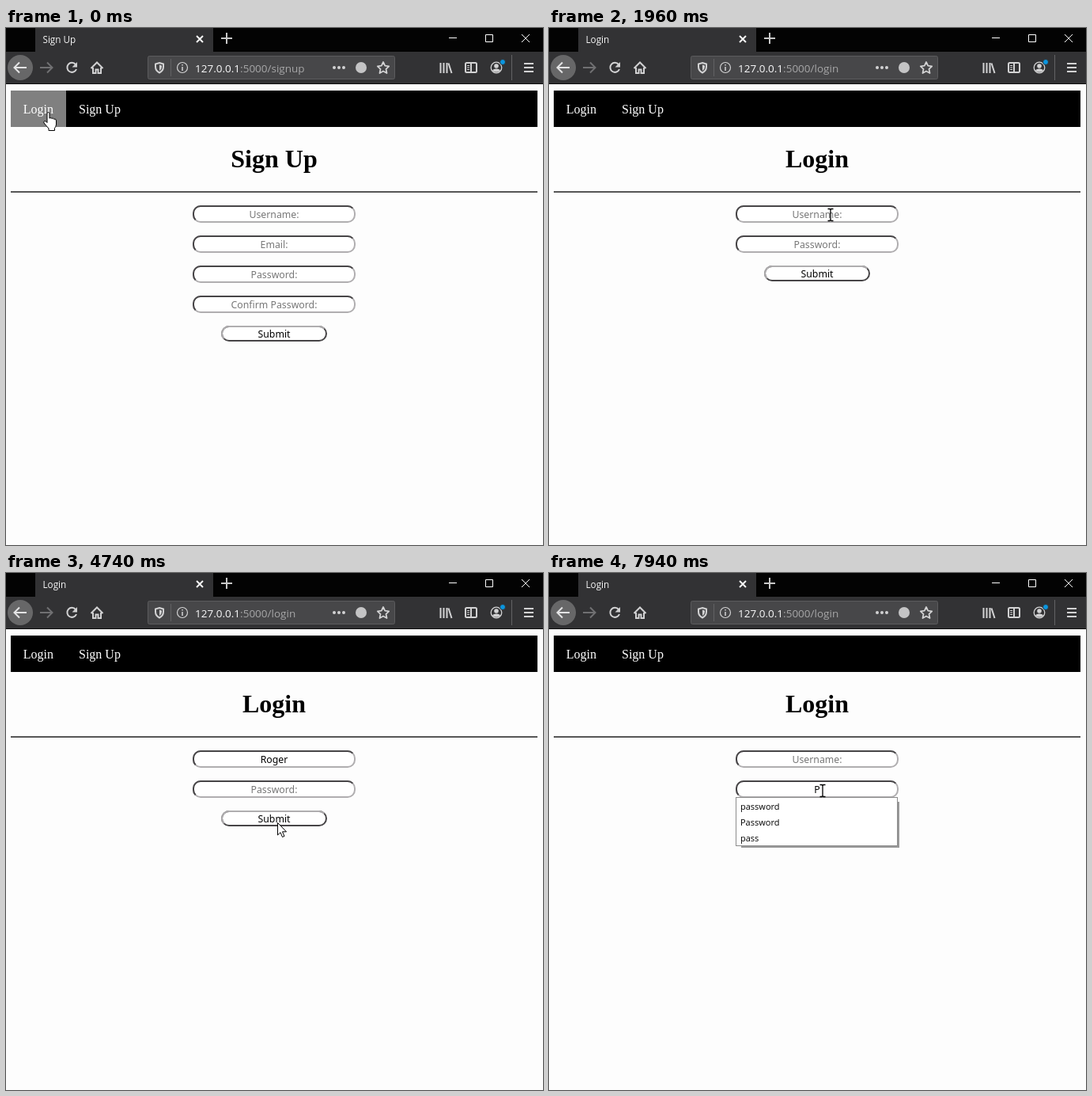
Write an HTML page that moves like this. It is 679 px wide and 653 px high and loops after 8000 ms.

```html
<!DOCTYPE html>
<html lang="en">
<head>
<meta charset="utf-8">
<title>Login form</title>
<style>
html, body { margin: 0; width: 100%; height: 100%; overflow: hidden; background: #fdfdfd; }
svg { display: block; width: 679px; height: 653px; }
text { white-space: pre; }
.ui { font-family: "Open Sans", sans-serif; }
.form { font: 12.3px "Noto Sans", sans-serif; text-anchor: middle; }
.nav { font: 16px "Liberation Serif", serif; fill: #fff; }
.head { font: bold 32px "Liberation Serif", serif; text-anchor: middle; }
.line { fill: none; stroke: #d2d2d3; stroke-width: 2; }
</style>
</head>
<body>
<svg viewBox="0 0 679 653">
  <rect width="679" height="653" fill="#fdfdfd"/>
  <!-- browser window -->
  <rect width="679" height="30" fill="#030303"/>
  <path d="M37 0H262V30H679V70H0V30H37Z" fill="#323234"/>
  <rect id="glow" x="37" width="166" height="30"/>
  <rect y="70" width="679" height="1" fill="#0c0c0d"/>
  <text id="tab" class="ui" x="46.5" y="19" font-size="11.7" fill="#f6f6f6"></text>
  <g class="line">
    <path d="M241 10L249 18M249 10L241 18" stroke="#f4f4f4"/>
    <path d="M272 13H286M279 6V20" stroke="#c8c8c8"/>
    <path d="M560 12.5H570M606.500 8.500H615.500V17.500H606.500ZM652 8L662 18M662 8L652 18" stroke="#fff" stroke-width="1"/>
    <circle cx="18" cy="50" r="16" fill="#676768" stroke="none"/>
    <path d="M26 50H11M17 43.500L10.500 50L17 56.500" stroke="#e4e4e5"/>
    <path d="M43 50H58M52 43.500L58.500 50L52 56.500" stroke="#707072"/>
    <path d="M88 46A6 6 0 1 0 89 52"/>
    <path d="M90 43V49.500H83.500Z" fill="#d2d2d3" stroke="none"/>
    <path d="M107.500 51L115 43.500L122.500 51M110 50V57H113.500V52.500H116.500V57H120V50"/>
    <rect x="179.500" y="35.500" width="312" height="29" rx="2" fill="#474749" stroke="#5c5c5e" stroke-width="1"/>
    <path d="M194 44L199 45.500V49Q199 54 194 56.500Q189 54 189 49V45.500Z"/>
    <path d="M194 46.500V54Q197 52 197 49V47.500Z" fill="#d2d2d3" stroke="none"/>
    <path d="M208.500 39V61M639.500 34V66" stroke="#626264" stroke-width="1"/>
    <circle cx="223" cy="50" r="6.500" stroke-width="1.200"/>
    <path d="M223 46V47.500M223 49V54" stroke-width="1.500"/>
    <path d="M415 50h0M421 50h0M427 50h0" stroke-width="4" stroke-linecap="round"/>
    <circle cx="449" cy="50" r="7" fill="#c4c4c5" stroke="none"/>
    <path d="M477 43L479.200 47.700L484.200 48.300L480.500 51.800L481.500 57L477 54.500L472.500 57L473.500 51.800L469.800 48.300L474.800 47.700Z" stroke-width="1.800" stroke-linejoin="round"/>
    <path d="M549.500 44V57M553.500 44V57M557.500 44V57M559.500 44.500L563.500 57"/>
    <rect x="581" y="44" width="14" height="12" rx="1.500"/>
    <path d="M588 44V56"/><path d="M583 47.500H586M583 50H586M583 52.500H586" stroke-width="1"/>
    <circle cx="620" cy="50" r="6.800" stroke-width="1.300"/>
    <circle cx="620" cy="48" r="2.800" fill="#d2d2d3" stroke="none"/>
    <path d="M615 54Q615.500 51.500 620 51.500T625 54Q620 57.500 615 54" fill="#d2d2d3" stroke="none"/>
    <circle cx="628" cy="43" r="3.500" fill="#0a96e0" stroke="#323234" stroke-width="1"/>
    <path d="M655 45H667M655 50H667M655 55H667"/>
  </g>
  <text class="ui" x="239" y="56" font-size="13.5" fill="#f9f9fa">127.0.0.1<tspan id="path" fill="#a7a7a8"></tspan></text>
  <!-- page -->
  <rect x="6" y="79" width="666" height="46"/>
  <rect id="hover" x="6" y="79" width="70" height="46" fill="#808080"/>
  <text class="nav" x="21.700" y="108">Login</text>
  <text class="nav" x="92" y="108">Sign Up</text>
  <text id="title" class="head" x="339" y="176"></text>
  <rect x="6" y="206" width="666" height="2" fill="#565656"/>
  <g id="form"></g>
  <g id="status">
    <path id="bubble" d="M0 635.500H110.500V653" fill="#fafafa" stroke="#d6d6d6"/>
    <text class="ui" x="2" y="651" font-size="11.05" fill="#444">127.0.0.1:5000/login</text>
  </g>
  <g id="pointer"></g>
</svg>
<script>
const LOOP = 8000, MID = 339;
const el = id => document.getElementById(id);
const pen = document.createElement('canvas').getContext('2d');

// Each row holds from its time until the next row.
const at = (rows, t) => rows.filter(r => r[0] <= t).pop();

const moves = [
  [0, 52, 107, 'hand'], [650, 85, 132, 'arrow'], [790, 121, 153, 'arrow'],
  [920, 283, 238, 'arrow'], [1060, 322, 252, 'arrow'], [1180, 338, 250, 'arrow'],
  [1340, 355, 236, 'beam'], [1480, 356, 236, 'beam'],
  [3900, 352, 262, 'arrow'], [4020, 346, 300, 'arrow'], [4140, 340, 345, 'arrow'],
  [4260, 338, 378, 'arrow'], [4380, 339, 388, 'arrow'], [4500, 340, 355, 'arrow'],
  [4620, 341, 318, 'arrow'], [4740, 343, 315, 'arrow'],
  [5230, 338, 322, 'arrow'], [5350, 334, 327, 'arrow'], [5470, 335, 322, 'arrow'],
  [5590, 337, 305, 'arrow'], [5710, 343, 274, 'beam'], [5830, 344, 246, 'arrow'],
  [5950, 349, 268, 'beam'], [6070, 347, 272, 'beam'], [6190, 346, 275, 'beam']
];
// time, text, caret shown
const userKeys = [
  [0, '', 0], [1480, '', 1], [1960, '', 0], [2520, 'R', 0], [2900, 'Ro', 1],
  [3140, 'Roge', 1], [3390, 'Roger', 1], [3650, 'Roger', 0], [5110, '', 0]
];
const passKeys = [[0, '', 0], [6310, '', 1], [6830, '', 0], [7300, '', 1], [7820, 'P', 0]];
const users = ['roger', 'Roger', 'Rogerbaston', 'rogerb'];
const lists = [
  [0, 0, []], [2520, 224, [...users, 'root', 'reader']], [3020, 224, users],
  [4260, 0, []], [7940, 262, ['password', 'Password', 'pass']]
];
const glows = [
  [0, 'none'], [650, '#2b3b4d'], [920, 'none'],
  [5230, '#2b3b4d'], [5350, '#33363c'], [5470, 'none']
];
const fades = [[0, 0], [120, .5], [250, 1], [1060, .6], [1180, .3], [1340, 0]];

const shapes = {
  arrow: '<path d="M.5 .5V16L4 12.700L6.500 18.500L9 17.400L6.500 11.800H11.500Z" fill="#fff" stroke="#000"/>',
  beam: '<path d="M-3.500 -7.500H-1L0 -6.500L1 -7.500H3.500M0 -7V7M-3.500 7.500H-1L0 6.500L1 7.500H3.500" fill="none" stroke="#000" stroke-width="1.300"/>',
  hand: '<path transform="translate(-5 -1)" d="M5 2Q5 .5 6.500 .5T8 2V8Q9.500 7 11 8.200Q12.500 7.500 13.500 9Q16.500 8.500 16.500 11V16Q16 19 14.500 20.500V23.500H7V21Q4 17.500 1 14Q0 12 2 11.500Q3.500 11.500 5 13.500Z" fill="#fff" stroke="#000"/>'
};

const label = (y, text, color) => `<text class="form" x="${MID}" y="${y}" fill="${color}">${text}</text>`;

// Bevelled pill: one colour all round, the other over its upper left half.
function pill(y, w, h, upper, lower) {
  const r = 9, k = r * (1 - Math.SQRT1_2), x = MID - w / 2 + 1, top = y + 1;
  w -= 2;
  h -= 2;
  const arc = `A${r} ${r} 0 0 1 `;
  return `<rect x="${x}" y="${top}" width="${w}" height="${h}" rx="${r}" fill="#fff" stroke="${lower}" stroke-width="2"/>
    <path d="M${x + k} ${top + h - k}${arc}${x} ${top + h - r}V${top + r}${arc}${x + r} ${top}H${x + w - r}${arc}${x + w - k} ${top + k}"
      fill="none" stroke="${upper}" stroke-width="2"/>`;
}

function field(y, hint, [, value, caret] = [0, '', 0]) {
  pen.font = '12.3px "Noto Sans", sans-serif';
  const x = MID + Math.round(pen.measureText(value).width / 2);
  return pill(y, 206, 22, '#474547', '#b0aeb0') +
    label(y + 16, value || hint, value ? '#000' : '#777') +
    (caret ? `<rect x="${x}" y="${y + 3}" width="1" height="16"/>` : '');
}

function button(y, pressed) {
  const edges = pressed ? ['#474547', '#b0aeb0'] : ['#b0aeb0', '#474547'];
  return pill(y, 134, 20, ...edges) + label(y + 15, 'Submit', '#000');
}

function dropdown([, y, items]) {
  if (!items.length) return '';
  const top = y + 21, h = items.length * 20 + 1;
  return `<rect x="243" y="${top + 6}" width="200" height="${h - 3}" fill="#999"/>
    <rect x="236.5" y="${top + .5}" width="204" height="${h}" fill="#fff" stroke="#8c8c8c"/>` +
    items.map((s, i) => `<text class="ui" x="242" y="${top + 16 + i * 20}" font-size="11">${s}</text>`).join('');
}

function draw(t) {
  const login = t >= 520, name = login ? 'Login' : 'Sign Up';
  el('tab').textContent = el('title').textContent = name;
  el('path').textContent = ':5000/' + (login ? 'login' : 'signup');
  el('glow').setAttribute('fill', at(glows, t)[1]);
  el('hover').setAttribute('opacity', t < 920 ? 1 : 0);
  el('status').setAttribute('opacity', at(fades, t)[1]);
  el('bubble').setAttribute('opacity', login ? 1 : 0);

  el('form').innerHTML = login
    ? field(224, 'Username:', at(userKeys, t)) + field(262, 'Password:', at(passKeys, t)) +
      button(300, t >= 4990 && t < 5110) + dropdown(at(lists, t))
    : ['Username:', 'Email:', 'Password:', 'Confirm Password:']
        .map((hint, i) => field(224 + 38 * i, hint)).join('') + button(376);

  const [, x, y, kind] = at(moves, t);
  el('pointer').innerHTML = `<g transform="translate(${x} ${y})">${shapes[kind]}</g>`;
}

const start = performance.now();
function tick() {
  draw((performance.now() - start) % LOOP);
  requestAnimationFrame(tick);
}
tick();
</script>
</body>
</html>
```
